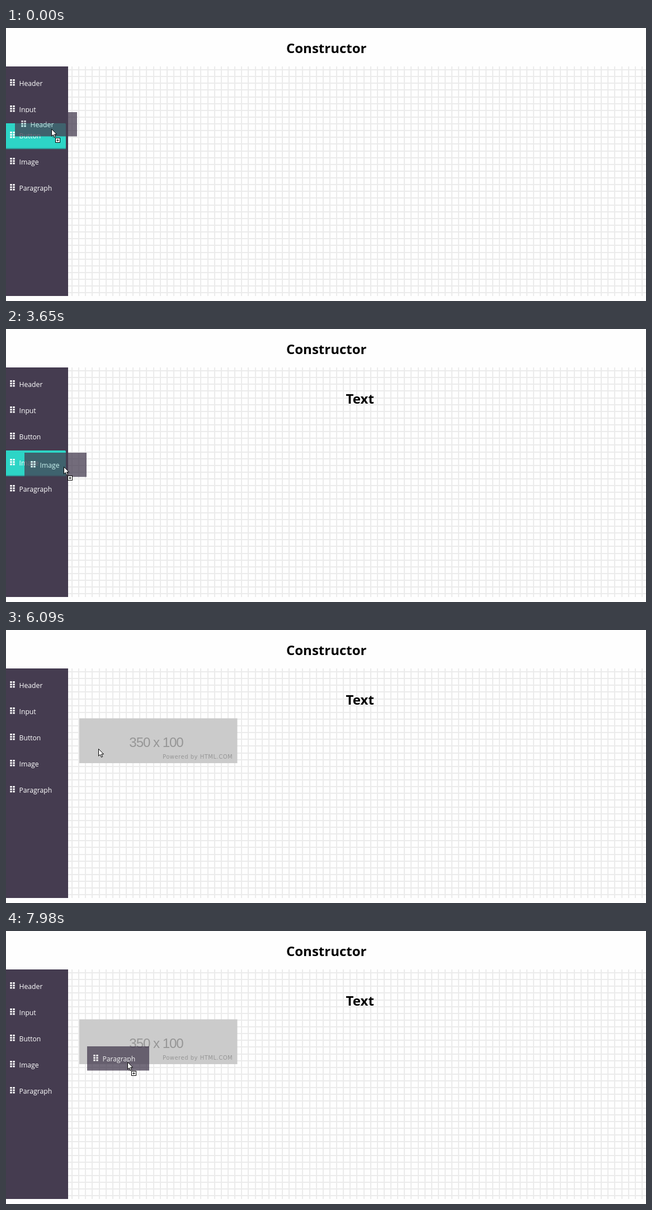
These frames come from a looping animation (1144 by 490 pixels, 8000 ms). An HTML page:

```html
<!DOCTYPE html>
<html lang="en">
<head>
<meta charset="utf-8">
<title>Constructor</title>
<style>
html, body { margin: 0; width: 100%; height: 100%; overflow: hidden; background: #fefefe; }
svg { display: block; width: 1144px; height: 490px; font: 12.2px "Open Sans", "Noto Sans", sans-serif; }
.bold { font-weight: 700; font-size: 24px; text-anchor: middle; }
.item { fill: #fff; }
</style>
</head>
<body>
<svg viewBox="0 0 1144 490">
  <defs><path id="grip"/></defs>
  <path id="grid" fill="#ebebeb"/>
  <text class="bold" x="572.7" y="44.5">Constructor</text>
  <rect y="69" width="111" height="412" fill="#453c50"/>
  <g id="hover">
    <rect x="-4" width="111" height="46" rx="2" fill="#2dd5c6"/>
    <rect y="44.5" width="107" height="1.8" fill="#2a9f9c"/>
  </g>
  <g id="menu"></g>
  <text id="heading" class="bold" x="632.7" y="134">Text</text>
  <g id="picture" fill="#969696">
    <rect x="131" y="158.5" width="282.5" height="80.5" fill="#cbcbcb"/>
    <text x="268.5" y="209.5" text-anchor="middle" style="font:24px 'Liberation Sans',Arial,sans-serif;letter-spacing:-1px">350 x 100</text>
    <text x="280" y="231" style="font:10px 'DejaVu Sans',sans-serif;letter-spacing:.5px">Powered by HTML.COM</text>
  </g>
  <g id="zone">
    <rect x="132.2" y="1.2" width="1005.6" height="22.6" fill="none" stroke="#000" stroke-width="2.4" stroke-dasharray="2.8 2.2"/>
    <text class="bold" x="635" y="19.5" style="font-size:18.2px">Drop here</text>
  </g>
  <g id="ghost" opacity=".75">
    <rect width="111" height="43.5" fill="#453c50"/>
    <g class="item"><use href="#grip"/><text id="label" x="27.5" y="26.7"></text></g>
  </g>
  <g id="arrow" stroke="#000">
    <path d="M.5 .5V13.2L3.4 10.5 5.5 15.3 7.6 14.4 5.6 9.8H9.6Z" fill="#fff"/>
    <g id="badge" fill="#fff">
      <path d="M2 15.5H8" stroke="#555" stroke-dasharray="1 1"/>
      <rect x="7.5" y="16.5" width="8" height="8"/>
      <path d="M9.3 20.5H13.7M11.5 18.3V22.7"/>
    </g>
  </g>
  <g id="hand" stroke-linecap="round" stroke-linejoin="round"></g>
</svg>
<script>
const $ = id => document.getElementById(id);
const LOOP = 8000, PITCH = 12.13;
const names = ["Header", "Input", "Button", "Image", "Paragraph"];
const itemTop = i => 77 + 47 * i;

// pointer stops: time, x, y
const track = [
  [0, 81, 181], [40, 81, 181], [330, 140, 212], [650, 215, 205], [830, 330, 178],
  [860, 350, 180], [880, 340, 179], [2400, 340, 179], [2420, 332, 180],
  [2700, 150, 215], [2880, 57, 240], [2970, 66, 243],
  [3400, 66, 243], [3650, 103, 247], [4180, 144, 209], [4650, 225, 186], [4820, 215, 178],
  [5840, 215, 178], [6580, 69, 281], [6660, 69, 281], [6730, 64, 283], [6810, 68, 287],
  [7110, 68, 287], [7500, 118, 240], [7800, 195, 200], [7890, 204, 218],
  [7980, 217, 235], [LOOP, 217, 235]
];

// dx, dy: where the item is held
const drags = [
  { from: 0, to: 1340, item: 0, zone: 89, dx: 74, dy: 22 },
  { from: 3400, to: 5020, item: 3, zone: 158, dx: 70, dy: 25 },
  { from: 7111, to: LOOP, item: 4, zone: 243, dx: 72, dy: 28 }
];

function pointer(t) {
  const i = track.findIndex(k => k[0] > t);
  const a = track[i - 1], b = track[i];
  const u = (t - a[0]) / (b[0] - a[0]);
  return [1, 2].map(j => Math.round(a[j] + (b[j] - a[j]) * u));
}

const show = (id, on) => $(id).style.display = on ? "" : "none";
const move = (id, x, y) => $(id).setAttribute("transform", `translate(${x} ${y})`);

function draw(t) {
  const [x, y] = pointer(t);
  const drag = drags.find(d => t >= d.from && t < d.to);
  const inMenu = x < 111;
  const overPicture = t > 7110 && x > 131;
  const hand = !drag && (x < 107 || (t >= 5020 && t < 5330));

  show("ghost", drag);
  show("badge", drag);
  show("hover", drag && inMenu);
  show("zone", drag && !inMenu && !overPicture);
  show("heading", t >= 1370);
  show("picture", t >= 5120);
  show("hand", hand);
  show("arrow", !hand);
  move("hand", x, y);
  move("arrow", x, y);
  if (drag) {
    const lag = drag.item ? 0 : Math.max(0, 1 - t / 400);
    $("label").textContent = names[drag.item];
    move("ghost", Math.round(x - drag.dx + 9 * lag), Math.round(y - drag.dy - 8 * lag));
    move("hover", 0, itemTop(Math.floor((y - 77) / 47)));
    move("zone", 0, drag.zone);
  }
}

let lines = "", dots = "";
for (let x = 117; x < 1144; x += PITCH) lines += `M${Math.round(x)} 69h2v412h-2z`;
for (let y = 74; y < 481; y += PITCH) lines += `M111 ${Math.round(y)}h1033v2h-1033z`;
for (let i = 0; i < 6; i++) dots += `M${11.3 + i % 2 * 5} ${15 + (i >> 1) * 4.3}h3.4v3h-3.4z`;
$("grid").setAttribute("d", lines);
$("grip").setAttribute("d", dots);

$("menu").innerHTML = names.map((name, i) =>
  `<g class="item" transform="translate(-4 ${itemTop(i)})"><use href="#grip"/><text x="27.5" y="26.7">${name}</text></g>`).join("");

// fingers and palm: a wide black stroke under a narrower white one
const palm = "M-2 6L-5.5 1M-2 2L-3.6 -4M0 1L-.4 -5.5M2 1L3.3 -4.7M3.5 2L5.6 -2M-2 2H4L3 6H-2Z";
$("hand").innerHTML = ["#000", "#fff"].map((c, i) =>
  `<path d="${palm}" fill="${c}" stroke="${c}" stroke-width="${3.2 - 1.6 * i}"/>`).join("");

const start = performance.now();
function tick() {
  draw((performance.now() - start) % LOOP);
  requestAnimationFrame(tick);
}
tick();
</script>
</body>
</html>
```
